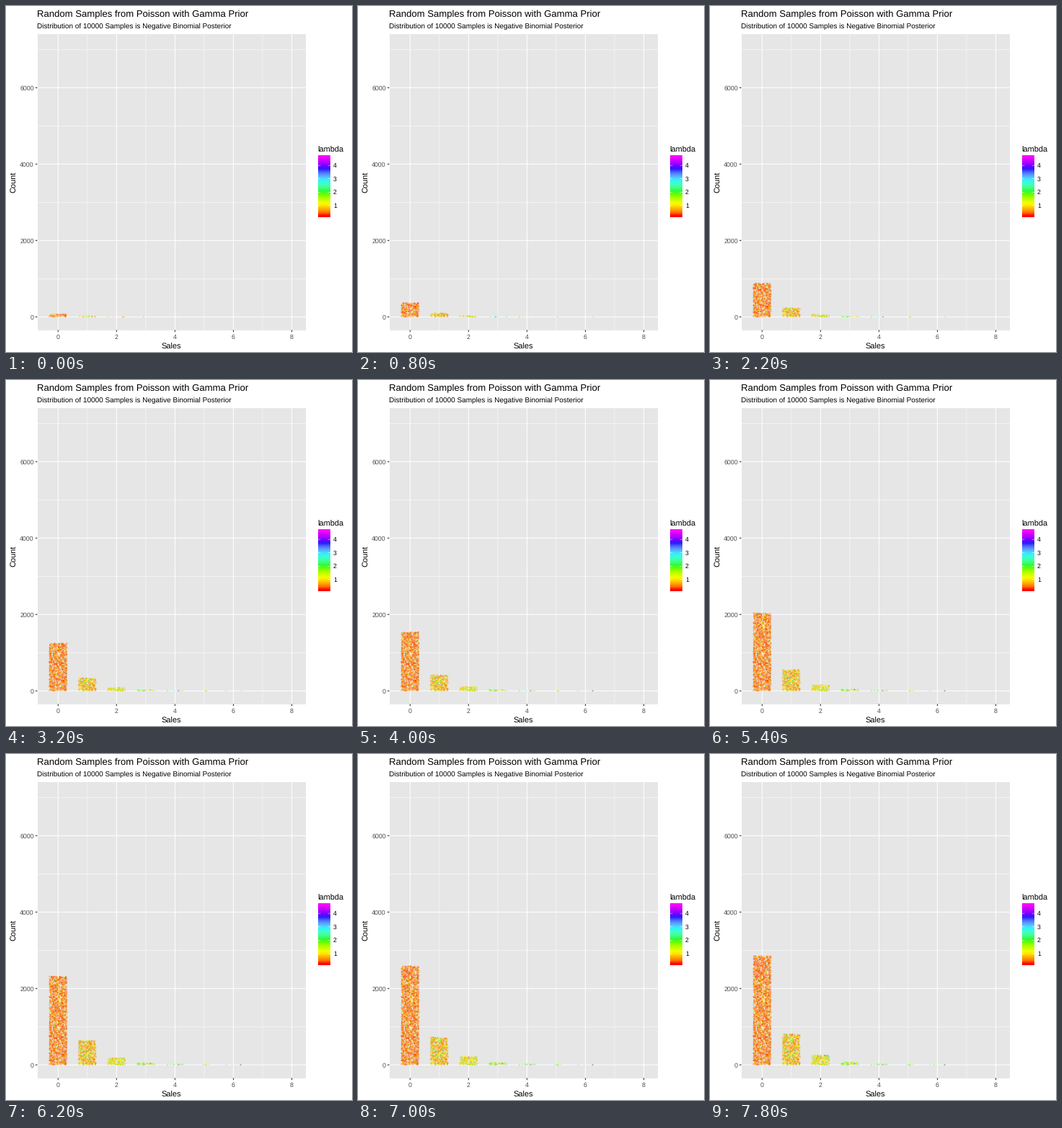
These frames come from a looping animation (480x480 px, 8000 ms). A matplotlib script:

```python
import numpy as np
import matplotlib.pyplot as plt
from matplotlib.animation import FuncAnimation
from matplotlib.patches import Rectangle

SIZE, DPI = 480, 80
PT = 72 / DPI                      # points per pixel
FRAMES, STEP = 40, 200
BATCH = 100                        # samples added per frame
TOTAL = FRAMES * BATCH

LEFT, RIGHT, TOP, BOTTOM = 43.5, 416, 38.5, 449.5
LAMBDA_MAX = 4.75

plt.rcParams["font.family"] = "Liberation Sans"
plt.rcParams["text.hinting"] = "none"

# Share of the samples per sales value, at the start and at the end.
SHARE_START = [0.735, 0.197, 0.050, 0.0135, 0.0045, 0.0016, 0.0012]
SHARE_END = [0.713, 0.2015, 0.064, 0.0175, 0.0045, 0.0016, 0.0012]

TO_XYZ = np.array([[0.4124, 0.3576, 0.1805],
                   [0.2126, 0.7152, 0.0722],
                   [0.0193, 0.1192, 0.9505]])
WHITE = TO_XYZ.sum(axis=1)
RAINBOW = np.array([[1, 0, 0], [1, 1, 0], [0, 1, 0],
                    [0, 1, 1], [0, 0, 1], [1, 0, 1]], float)


def to_lab(rgb):
    lin = np.where(rgb > 0.04045, ((rgb + 0.055) / 1.055) ** 2.4, rgb / 12.92)
    v = lin @ TO_XYZ.T / WHITE
    f = np.where(v > 0.008856, np.cbrt(v), 7.787 * v + 16 / 116)
    x, y, z = f.T
    return np.stack([116 * y - 16, 500 * (x - y), 200 * (y - z)], axis=1)


def to_rgb(lab):
    y = (lab[:, 0] + 16) / 116
    f = np.stack([y + lab[:, 1] / 500, y, y - lab[:, 2] / 200], axis=1)
    v = np.where(f > 0.2069, f ** 3, (f - 16 / 116) / 7.787) * WHITE
    lin = np.clip(v @ np.linalg.inv(TO_XYZ).T, 0, 1)
    rgb = np.where(lin > 0.0031308, 1.055 * lin ** (1 / 2.4) - 0.055, 12.92 * lin)
    return np.clip(rgb, 0, 1)


def gradient(t):
    """Rainbow colours blended in Lab space, t from 0 to 1."""
    stops = np.linspace(0, 1, len(RAINBOW))
    lab = to_lab(RAINBOW)
    return to_rgb(np.stack([np.interp(t, stops, c) for c in lab.T], axis=1))


def px(sales):
    return 72.3 + 40.53 * np.asarray(sales)


def py(count):
    return 431.3 - 0.053 * np.asarray(count)


def make_samples():
    """Positions, colours and arrival numbers, in order of arrival."""
    rng = np.random.default_rng(12)
    drawn = np.arange(TOTAL + 1)
    late = (drawn / TOTAL) ** 3
    pos, lam, arrival = [], [], []
    for sales, (start, end) in enumerate(zip(SHARE_START, SHARE_END)):
        height = drawn * (start + (end - start) * late)
        n = round(height[-1])
        rank = np.arange(1, n + 1)
        jitter = rng.uniform(-0.3, 0.3, n)
        pos.append(np.stack([px(sales + jitter), py(rank)], axis=1))
        lam.append(rng.gamma(1 + sales, 0.36, n))
        arrival.append(np.interp(rank - 0.5, height, drawn))
    arrival = np.concatenate(arrival)
    order = np.argsort(arrival, kind="stable")
    level = np.clip(np.concatenate(lam) / LAMBDA_MAX, 0, 1)
    return np.concatenate(pos)[order], gradient(level)[order], arrival[order]


fig = plt.figure(figsize=(SIZE / DPI, SIZE / DPI), dpi=DPI, facecolor="white")
ax = fig.add_axes([0, 0, 1, 1])


def label(x, y, text, size, color="black", **kw):
    ax.text(x, y, text, fontsize=size * PT, color=color, va="baseline", **kw)


def line(xs, ys, width, color="white", z=2):
    ax.plot(xs, ys, color=color, lw=width * PT, zorder=z,
            solid_capstyle="butt", snap=False)


def draw_panel():
    ax.add_patch(Rectangle((LEFT, TOP), RIGHT - LEFT, BOTTOM - TOP,
                           fc="#E6E6E6", lw=0, zorder=1))
    for sales in range(9):
        x = px(sales)
        major = sales % 2 == 0
        line([x, x], [TOP, BOTTOM], 1.07 if major else 0.53)
        if major:
            line([x, x], [BOTTOM, BOTTOM + 2.75], 1.07, "#333333")
            label(x, 462, str(sales), 8.8, "#4D4D4D", ha="center")
    for count in range(0, 8000, 1000):
        y = py(count)
        major = count % 2000 == 0
        line([LEFT, RIGHT], [y, y], 1.07 if major else 0.53)
        if major:
            line([LEFT - 2.75, LEFT], [y, y], 1.07, "#333333")
            label(38.6, y + 3.2, str(count), 8.8, "#4D4D4D", ha="right")
    label(43.3, 15, "Random Samples from Poisson with Gamma Prior", 13.15)
    label(43.3, 31, "Distribution of 10000 Samples is Negative Binomial Posterior", 9.95)
    label(229.7, 475.4, "Sales", 11, ha="center")
    label(13.4, 244, "Count", 11, ha="center", rotation=90, rotation_mode="anchor")


def draw_legend():
    x0, x1, y0, y1 = 433, 450, 207, 293
    label(432.7, 203, "lambda", 11)
    bar = gradient(np.linspace(1, 0, 20))[:, None, :]
    ax.imshow(bar, extent=(x0, x1, y1, y0), aspect="auto",
              interpolation="bilinear", zorder=3)
    for value in range(1, 5):
        y = 295.5 - 18.6 * value
        line([x0, x0 + 3.4], [y, y], 0.5, z=4)
        line([x1 - 3.4, x1], [y, y], 0.5, z=4)
        label(453.9, y + 3.1, str(value), 8.8)


draw_panel()
draw_legend()
ax.set_xlim(0, SIZE)
ax.set_ylim(SIZE, 0)
ax.axis("off")

points, colors, arrivals = make_samples()
dots = ax.scatter([], [], s=(2 * PT) ** 2, linewidths=0, alpha=0.4, zorder=5)


def update(frame):
    n = np.searchsorted(arrivals, BATCH * (frame + 1), side="right")
    dots.set_offsets(points[:n])
    dots.set_facecolor(colors[:n])
    return dots,


anim = FuncAnimation(fig, update, frames=FRAMES, interval=STEP,
                     repeat=True, repeat_delay=0)
plt.show()
```
